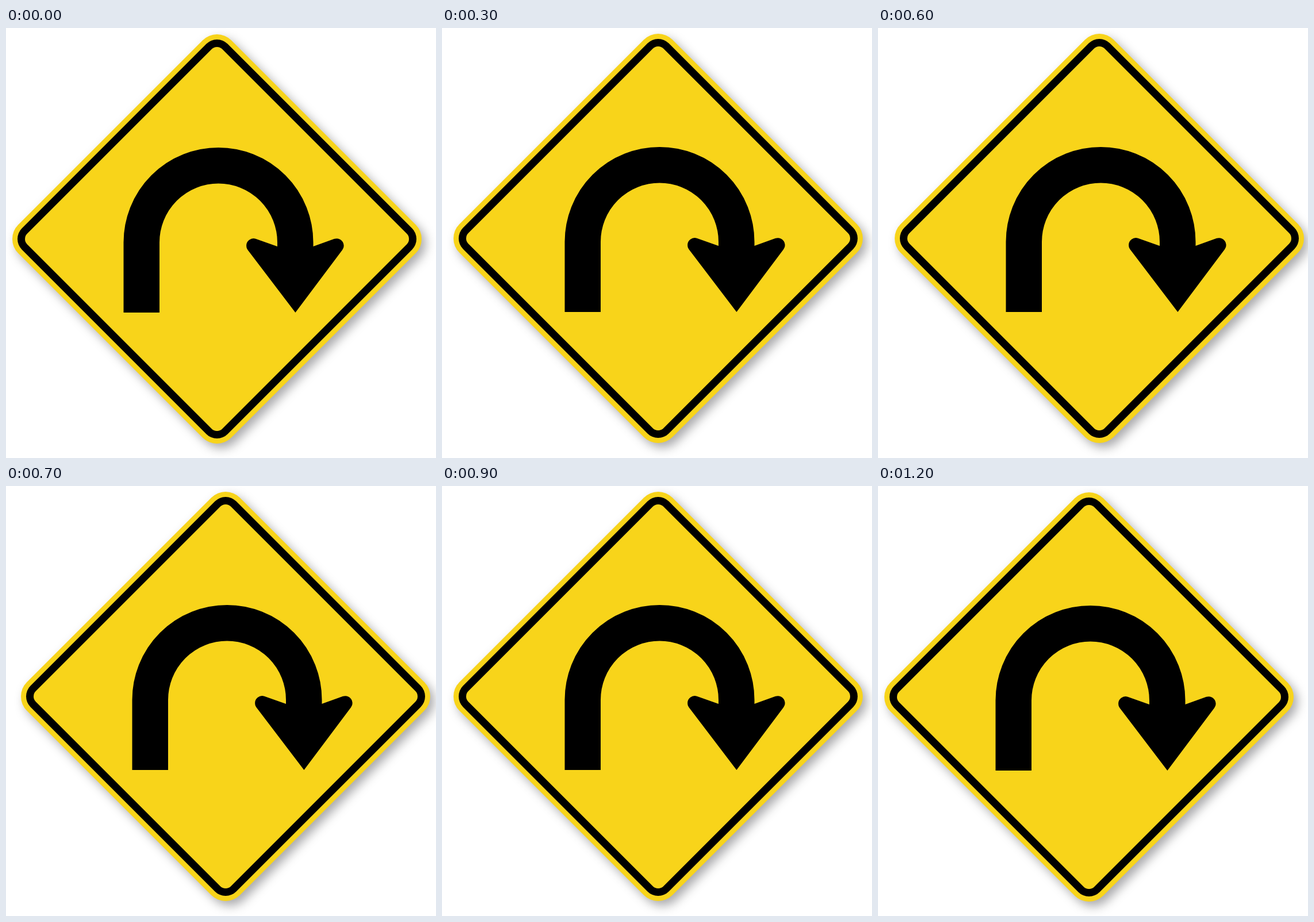
An HTML page with a canvas that plays this animation: 748 px wide and 748 px high, repeating every 1300 ms.

```html
<!DOCTYPE html>
<html lang="en">
<head>
<meta charset="utf-8">
<title>Sliding U-turn sign</title>
<style>
  html, body { margin: 0; width: 100%; height: 100%; overflow: hidden; background: #fff; }
  canvas { display: block; width: 748px; height: 748px; }
</style>
</head>
<body>
<canvas id="stage" width="748" height="748"></canvas>
<script>
const ctx = document.getElementById('stage').getContext('2d');
const YELLOW = '#f8d41a';
const BLACK = '#000';
const STEP = 100;
const STEPS = 13;

// Square on its corner, centred on the sign; extent is centre to rounded tip.
function diamond(extent, radius, color) {
  const half = radius + (extent - radius) / Math.SQRT2;
  ctx.save();
  ctx.translate(367, 367);
  ctx.rotate(Math.PI / 4);
  ctx.beginPath();
  ctx.roundRect(-half, -half, 2 * half, 2 * half, radius);
  ctx.fillStyle = color;
  ctx.fill();
  ctx.restore();
}

function board() {
  ctx.save();
  ctx.shadowColor = 'rgba(0, 0, 10, 0.34)';
  ctx.shadowBlur = 18;
  ctx.shadowOffsetX = 7;
  ctx.shadowOffsetY = 8;
  diamond(356, 35, YELLOW);
  ctx.restore();
  diamond(347, 26, BLACK);
  diamond(334, 13, YELLOW);
}

function arrow() {
  ctx.beginPath();
  ctx.moveTo(235.75, 495);
  ctx.lineTo(235.75, 373);
  ctx.arc(369.5, 373, 133.75, Math.PI, 0);
  ctx.lineTo(503.25, 382);
  ctx.lineWidth = 62.5;
  ctx.strokeStyle = BLACK;
  ctx.stroke();

  // Head with two rounded barbs
  const mid = 502.8, reach = 72.3, r = 12.4, y = 378.6;
  const low = 2.489, high = 5.039;
  ctx.beginPath();
  ctx.moveTo(503.4, 495);
  ctx.arc(mid - reach, y, r, low, high);
  ctx.lineTo(472, 380);
  ctx.lineTo(534.3, 380);
  ctx.arc(mid + reach, y, r, Math.PI - high, Math.PI - low);
  ctx.closePath();
  ctx.fillStyle = BLACK;
  ctx.fill();
}

function draw(now) {
  const k = Math.floor(now / STEP) % STEPS;
  const swing = 6 - Math.abs(6 - k);
  ctx.fillStyle = '#fff';
  ctx.fillRect(0, 0, 748, 748);
  ctx.save();
  ctx.translate(3 * swing, swing > 2 ? -1 : 0);
  board();
  arrow();
  ctx.restore();
}

let start;
function tick(now) {
  start ??= now;
  draw(now - start);
  requestAnimationFrame(tick);
}
draw(0);
requestAnimationFrame(tick);
</script>
</body>
</html>
```
